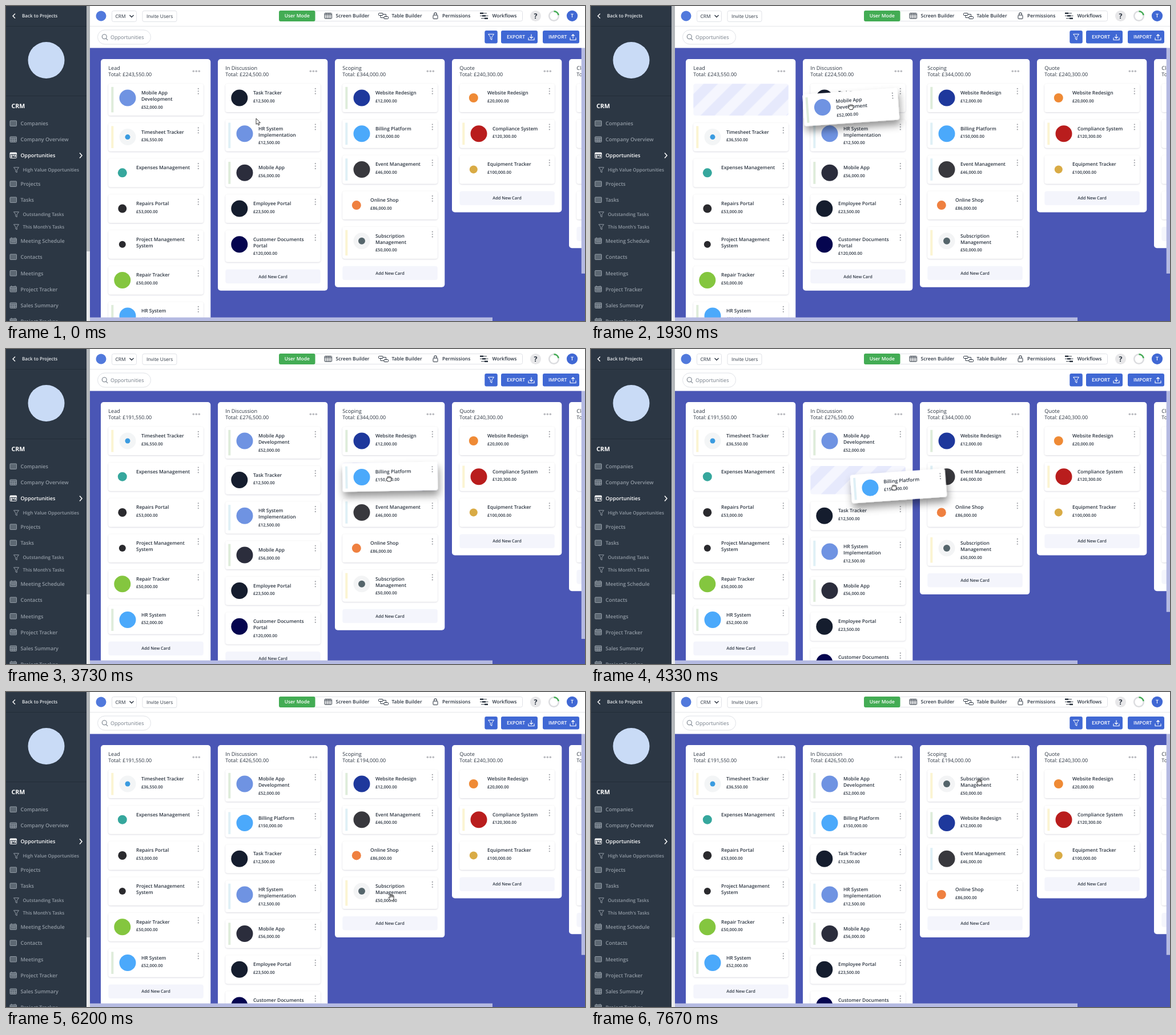
Recreate the animation shown at these times as an HTML page. Size 1014 by 552 pixels, loop 9.99 s.

```html
<!DOCTYPE html>
<html lang="en">
<head>
<meta charset="utf-8">
<title>Opportunities board</title>
<style>
html, body { margin: 0; width: 100%; height: 100%; overflow: hidden; background: #fff; }
svg { display: block; width: 1014px; height: 552px; }
text { font-family: "Open Sans", sans-serif; text-rendering: geometricPrecision; white-space: pre; }
</style>
</head>
<body>
<svg id="stage" viewBox="0 0 1014 552" xmlns="http://www.w3.org/2000/svg"></svg>
<script>
const LOOP = 9990, FPS = 15;
const CARD_W = 166.5, CARD_H = 49.7, TALL_H = 55.6, GAP = 13, TOP = 136.3, INSET = 13.3;
const INK = '#2b3440', SIDE = '#2c3744', BLUE = '#4068d4', BOARD = '#4a56b5';
const GREEN = '#deecda', YELLOW = '#fbf4d2', CYAN = '#dff0f6';

// ---------- drawing helpers ----------
const rect = (x, y, w, h, fill, r = 0, more = '') =>
  `<rect x="${x}" y="${y}" width="${w}" height="${h}" rx="${r}" fill="${fill}" ${more}/>`;
const circle = (x, y, r, fill, more = '') =>
  `<circle cx="${x}" cy="${y}" r="${r}" fill="${fill}" ${more}/>`;
const line = (d, color, w = 1, more = '') =>
  `<path d="${d}" fill="none" stroke="${color}" stroke-width="${w}" ${more}/>`;
// y is the middle of the capitals
const text = (x, y, s, size, weight = 400, fill = INK, more = '') =>
  `<text x="${x}" y="${y + size * 0.355}" font-size="${size}" font-weight="${weight}" fill="${fill}" ${more}>${s}</text>`;
const funnel = (x, y, s, color, w = 1) =>
  line(`M${x - s} ${y - s}H${x + s}L${x + s * .25} ${y}V${y + s}L${x - s * .25} ${y + s * .7}V${y}Z`, color, w, 'stroke-linejoin="round"');
const middle = 'text-anchor="middle"';

// ---------- data ----------
// title lines, amount, bar colour, badge colours and radii
const cards = {
  mobile:   [['Mobile App', 'Development'], '£52,000.00', GREEN, ['#6f93e2', 14.5]],
  time:     [['Timesheet Tracker'], '£36,550.00', YELLOW, ['#f3f5f6', 14.5, '#3a9be0', 4.5]],
  expenses: [['Expenses Management'], '', '', ['#36a79d', 8]],
  repairs:  [['Repairs Portal'], '£53,000.00', '', ['#2a2a2e', 7.5]],
  project:  [['Project Management', 'System'], '', '', ['#2a2a2e', 6]],
  repair:   [['Repair Tracker'], '£50,000.00', '', ['#84c63f', 14.5]],
  hr:       [['HR System'], '£52,000.00', GREEN, ['#4ba9fb', 14.5]],
  task:     [['Task Tracker'], '£12,500.00', '', ['#151d2e', 14.5]],
  hrImpl:   [['HR System', 'Implementation'], '£12,500.00', CYAN, ['#6f93e2', 14.5]],
  app:      [['Mobile App'], '£56,000.00', GREEN, ['#2b2d3c', 14.5]],
  employee: [['Employee Portal'], '£23,500.00', '', ['#151d2e', 14.5]],
  docs:     [['Customer Documents', 'Portal'], '£120,000.00', '', ['#05054f', 14.5]],
  web:      [['Website Redesign'], '£12,000.00', GREEN, ['#1e389c', 14.5]],
  billing:  [['Billing Platform'], '£150,000.00', CYAN, ['#4ba9fb', 14.5]],
  event:    [['Event Management'], '£46,000.00', CYAN, ['#38383d', 14.5]],
  shop:     [['Online Shop'], '£86,000.00', '', ['#ef8040', 8]],
  sub:      [['Subscription', 'Management'], '£50,000.00', YELLOW, ['#f3f4f5', 14.5, '#55656b', 6]],
  quoteWeb: [['Website Redesign'], '£20,000.00', '', ['#ef8a35', 8]],
  comply:   [['Compliance System'], '£120,300.00', YELLOW, ['#b91d1d', 14.5]],
  equip:    [['Equipment Tracker'], '£100,000.00', '', ['#d9ab45', 7]],
  won1: [[''], '', '', null], won2: [[''], '', '', null], won3: [[''], '', '', null], won4: [[''], '', '', null]
};
const height = id => cards[id][0].length > 1 && cards[id][1] ? TALL_H : CARD_H;
const columns = ['Lead', 'In Discussion', 'Scoping', 'Quote', 'Closed'].map((name, i) => [166 + 205 * i, name]);

// Who stands where at a given time
function lists(t) {
  const lead = ['time', 'expenses', 'repairs', 'project', 'repair', 'hr'];
  const talk = ['task', 'hrImpl', 'app', 'employee', 'docs'];
  const scope = ['web', 'event', 'shop'];
  (t < 1999 ? lead : talk).unshift('mobile');
  (t < 4266 ? scope : talk).splice(1, 0, 'billing');
  const place = t < 6466 ? scope.length : t < 6733 ? 2 : t < 6999 ? 1 : 0;
  scope.splice(place, 0, 'sub');
  return [lead, talk, scope, ['quoteWeb', 'comply', 'equip'], ['won1', 'won2', 'won3', 'won4']];
}
const totals = t => [
  t < 2866 ? '243,550' : '191,550',
  t < 2866 ? '224,500' : t < 5599 ? '276,500' : '426,500',
  t < 5599 ? '344,000' : '194,000', '240,300', '180,000'
];

// ---------- motion tracks: [time, ...values] ----------
const pointer = [
  [133, 438, 197], [667, 264, 165], [800, 264, 165], [1200, 293, 181], [1800, 433, 179], [1933, 455, 176.5],
  [2133, 467, 171], [3000, 467, 171], [3533, 670, 227], [3733, 670.5, 227], [4000, 646, 232], [4333, 530.5, 242],
  [4667, 484, 247], [4800, 478, 247], [5667, 478, 247], [6200, 675, 360], [6267, 675, 360], [6800, 676, 239],
  [7200, 680, 158]
];
const drags = [
  { id: 'mobile', from: 866, drop: 2066, to: 2466, x: 179.3, y: TOP,
    path: [[800, 0, 0, 0], [1200, 29.5, 15.5, -3.6], [1800, 170, 15, -4], [1933, 192.5, 13, -4], [2133, 205, 0, 0]] },
  { id: 'billing', from: 3666, drop: 4533, to: 4866, x: 589.3, y: 199,
    path: [[3667, 0, 0, 0], [3733, 0, 0, -1], [4000, -22, 5, -4], [4333, -134, 16, -4], [4533, -190, 12, -4], [4667, -205, 5.9, 0]] },
  { id: 'sub', from: 6333, drop: 7266, to: 7666, x: 589.3, y: 324.4,
    path: [[6267, 0, 0, 0], [6533, 0, -54, -4], [6800, 1, -121, -4], [7200, 5, -202, -4], [7400, 0, -188.1, 0]] }
];

// Smooth curve through the keys that never overshoots
function follow(keys, t) {
  const last = keys.length - 1;
  if (t <= keys[0][0]) return keys[0].slice(1);
  if (t >= keys[last][0]) return keys[last].slice(1);
  let i = 0;
  while (t >= keys[i + 1][0]) i++;
  const slope = (k, n) => (keys[k + 1][n] - keys[k][n]) / (keys[k + 1][0] - keys[k][0]);
  const tangent = (k, n) => {
    if (k === 0 || k === last) return 0;
    const a = slope(k - 1, n), b = slope(k, n);
    return a * b > 0 ? 2 * a * b / (a + b) : 0;
  };
  const [t0, t1] = [keys[i][0], keys[i + 1][0]], d = t1 - t0, u = (t - t0) / d;
  return keys[i].slice(1).map((p, j) => {
    const n = j + 1, q = keys[i + 1][n];
    return p + (q - p) * u * u * (3 - 2 * u) +
      d * u * (1 - u) * ((1 - u) * tangent(i, n) - u * tangent(i + 1, n));
  });
}

// ---------- static parts ----------
function sidebar() {
  const grey = '#929ba5', dim = '#5d6873';
  let s = rect(0, 0, 141, 552, SIDE) + rect(0, 35, 141, 1, '#232d38') + rect(0, 157, 141, 1, '#232d38') +
    line('M16 13.5L12 17.5L16 21.5', '#fff', 1.4) + text(28, 17.5, 'Back to Projects', 8.1, 600, '#e6e9ec') +
    circle(70.5, 95, 32, '#c9dbf6') + text(9.5, 175, 'CRM', 10.6, 700, '#fff');
  const items = [[206, 'Companies', 0], [234, 'Company Overview', 1], [262, 'Opportunities', 2], [312, 'Projects', 0],
    [340, 'Tasks', 0], [412, 'Meeting Schedule', 3], [440, 'Contacts', 0], [468.5, 'Meetings', 0],
    [496.5, 'Project Tracker', 3], [525, 'Sales Summary', 1], [553, 'Project Tracker', 3]];
  for (const [y, name, kind] of items) {
    const on = kind === 2, c = on ? '#fff' : grey;
    s += rect(7, y - 5, 11.5, 9.5, on ? 'none' : dim, 1, `stroke="${c}" stroke-width="1"`);
    if (kind === 1) s += line(`M7 ${y - 2}h11.5M7 ${y + 1.5}h11.5M11 ${y - 2}v6M14.5 ${y - 2}v6`, c, .8);
    if (on) s += rect(7, y - 5, 11.5, 2.5, c) + rect(8.5, y - 1.5, 2, 5, c) + rect(11.7, y - 1.5, 2, 3, c) + rect(15, y - 1.5, 2, 4, c);
    if (kind === 3) s += line(`M7 ${y - 2}h11.5M9.5 ${y - 6.5}v2M16 ${y - 6.5}v2M9 ${y + 1}h8`, c, 1);
    s += text(25.5, y, name, 9, 600, c);
  }
  for (const [y, name] of [[287, 'High Value Opportunities'], [365, 'Outstanding Tasks'], [387, "This Month's Tasks"]])
    s += funnel(18, y + .3, 4.5, grey) + text(29.5, y, name, 8.1, 600, grey);
  return s + line('M129 257.5L133 262L129 266.5', '#fff', 1.5) + rect(141, 0, 6, 552, '#e9eaec') + rect(141, 0, 6, 430, '#b3b7bb');
}

function header() {
  const edge = 'stroke="#e0e2e7" stroke-width="1"';
  let s = rect(147, 0, 867, 73.5, '#fff') + rect(147, 35, 867, 1, '#e6e7ea') + circle(166.5, 17.5, 9, '#5179dc') +
    rect(185.5, 8.5, 43, 19, '#fff', 3, edge) + text(191.5, 17.8, 'CRM', 8.45) + line('M216.5 16l3.5 3.5l3.5-3.5', INK, 1.4) +
    rect(239, 8.5, 60, 19, '#fff', 3, edge) + text(246, 17.8, 'Invite Users', 8.45) +
    rect(478.5, 8.5, 426, 18, '#fff', 3, edge) + rect(478, 8, 63.5, 19, '#43ac54', 3) +
    text(509.7, 17.3, 'User Mode', 8.45, 600, '#fff', middle);
  for (const [x, name] of [[577.5, 'Screen Builder'], [675.5, 'Table Builder'], [764, 'Permissions'], [851.5, 'Workflows']])
    s += text(x, 17.3, name, 8.45, 600);
  s += rect(558, 12.5, 12.5, 9.5, 'none', 1, `stroke="${INK}"`) + line('M561 12.5v9.5M564.2 12.5v9.5M567.4 12.5v9.5M558 15h12.5', INK, .9) +
    rect(652.5, 12.5, 7.5, 4, 'none', 1, `stroke="${INK}"`) + rect(662, 18.5, 7.5, 4, 'none', 1, `stroke="${INK}"`) +
    line('M660 14.5h5.5v4M656 16.5v4h6', INK, .9) +
    rect(748, 16, 8, 6.5, 'none', 1, `stroke="${INK}"`) + line('M749.8 16v-2a2.2 2.2 0 0 1 4.4 0v2', INK, 1.1) +
    rect(830, 11.5, 6, 2.5, INK) + rect(834, 16, 6, 2.5, INK) + rect(838, 20.5, 6, 2.5, INK) +
    line('M836 12.7h6M830 17.2h4M840 17.2h4.5M832 21.7h6', INK, .9) +
    circle(927.5, 17.5, 9.5, '#e7e7e9') + text(927.5, 17.5, '?', 12.5, 700, INK, middle) +
    circle(959.5, 17.5, 8.3, 'none', 'stroke="#dcdde0" stroke-width="2.6"') +
    line('M959.5 9.2A8.3 8.3 0 0 1 967.6 16', '#43ac54', 2.6) +
    circle(991.5, 17.3, 9.6, BLUE) + text(991.5, 17.3, 'T', 8.8, 600, '#fff', middle) +
    rect(160.5, 42, 93, 25, '#fff', 12.5, edge) + circle(172.3, 53.8, 4, 'none', 'stroke="#747d88" stroke-width="1.1"') +
    line('M175.2 56.8l3 3', '#747d88', 1.1) + text(183, 54.7, 'Opportunities', 9, 400, '#727b86') +
    rect(838.3, 43, 22.5, 22.5, BLUE, 3) + funnel(849.6, 54.3, 5, '#fff') +
    rect(867, 43, 64, 22.5, BLUE, 3) + text(877, 54.3, 'EXPORT', 8.45, 600, '#fff') +
    rect(940, 43, 64, 22.5, BLUE, 3) + text(950, 54.3, 'IMPORT', 8.45, 600, '#fff');
  const tray = x => `M${x} 55.5v4h10v-4`;
  return s + line(tray(915) + 'M920 49.5v7M917.3 54l2.7 2.7l2.7-2.7', '#fff', 1.1) +
    line(tray(988) + 'M993 57v-7M990.3 52.5l2.7-2.7l2.7 2.7', '#fff', 1.1);
}

function cardArt(id) {
  const [title, amount, bar, badge] = cards[id], h = height(id);
  const cx = bar ? 33.7 : 24.5, tx = bar ? 57.6 : 48.7;
  let s = rect(0, 0, CARD_W, h, '#fff', 4, 'filter="url(#soft)"');
  if (bar) s += rect(5, 5.5, 4, h - 11, bar);
  if (badge) for (let i = 0; i < badge.length; i += 2) s += circle(cx, 24.7, badge[i + 1], badge[i]);
  title.forEach((part, i) => s += text(tx, 15.8 + 11 * i, part, 8.45, 600));
  s += text(tx, 29.7 + (title.length - 1) * 11, amount, 7.4, 600);
  for (const y of [8.6, 13, 17.4]) s += circle(157.5, y, 1.15, '#a3a5aa');
  return `<g id="${id}">${s}</g>`;
}

const columnArt = ([x, name], i) =>
  rect(x, 93, 192.3, 100, '#fff', 5, `id="col${i}"`) + text(x + INSET, 108.4, name, 9.15) +
  text(x + INSET, 119.8, '', 9, 400, INK, `id="sum${i}"`) +
  [162, 167, 172].map(d => circle(x + d + .3, 114.2, 1.8, '#b9babf')).join('') +
  `<g id="add${i}">${rect(x + INSET, 0, CARD_W, 24.6, '#f4f5fc', 4)}${text(x + 96.5, 12.3, 'Add New Card', 7.4, 600, INK, middle)}</g>`;

const stage = document.getElementById('stage');
stage.innerHTML = `<defs>
  <filter id="soft" x="-10%" y="-20%" width="120%" height="150%"><feDropShadow dx="0" dy=".8" stdDeviation="1.1" flood-color="#1c2040" flood-opacity=".2"/></filter>
  <filter id="lift" x="-30%" y="-60%" width="160%" height="260%"><feDropShadow dx="2" dy="9" stdDeviation="7" flood-color="#000" flood-opacity=".42"/></filter>
  <pattern id="stripes" width="50" height="50" patternUnits="userSpaceOnUse" patternTransform="translate(18 0)">
    <rect width="50" height="50" fill="#f5f6fe"/><path d="M0 0H25L0 25ZM50 0V25L25 50H0Z" fill="#e6e9fc"/></pattern>
  <clipPath id="view"><rect x="147" y="73" width="861" height="473"/></clipPath></defs>` +
  rect(147, 73, 867, 479, BOARD) +
  `<g clip-path="url(#view)">${columns.map(columnArt).join('')}<g id="slot">${rect(0, 0, CARD_W, 50, 'url(#stripes)', 4)}</g>` +
  `<g id="deck">${Object.keys(cards).map(cardArt).join('')}</g></g>` +
  rect(147, 545.7, 705, 6.3, '#b5bae2') + rect(1007.7, 73, 6.3, 395, '#b5bae2', 0, 'id="thumb"') +
  sidebar() + header() +
  `<g id="pointer" stroke="#222" stroke-width=".9" stroke-linejoin="round" fill="#fff">
    <path id="arrow" d="M0 0V10.4L2.4 8.3L4 12L5.8 11.2L4.2 7.7H7.4Z"/>
    <path id="open" d="M-2.6 .5V-3.6a.85 .85 0 0 1 1.7 0V-4.4a.85 .85 0 0 1 1.7 0V-3.8a.85 .85 0 0 1 1.7 0V-2.6a.8 .8 0 0 1 1.6 0V2.2L3.2 5.2H-1.8L-4.8 .8a.9 .9 0 0 1 1.4-1.1ZM-.9-3.6V-.3M.8-4V-.3M2.5-3V-.3"/>
    <path id="fist" d="M-2.8 .2V-2.4a.85 .85 0 0 1 1.8 0a.85 .85 0 0 1 1.8-.3a.85 .85 0 0 1 1.7 .3a.8 .8 0 0 1 1.6 .5V2.2L3.2 5H-1.8L-4.2 1.8V.4ZM-1-2.2V-.6M.8-2.4V-.6M2.5-2.2V-.6"/></g>`;

const el = id => document.getElementById(id);
const move = (id, x, y, extra = '') => el(id).setAttribute('transform', `translate(${x} ${y})${extra}`);
const show = (id, on) => el(id).setAttribute('display', on ? 'inline' : 'none');
let lifted = null;

function lift(id) {
  if (id === lifted) return;
  if (lifted) el(lifted).firstChild.setAttribute('filter', 'url(#soft)');
  if (id) {
    el('deck').appendChild(el(id));
    el(id).firstChild.setAttribute('filter', 'url(#lift)');
  }
  lifted = id;
}

function draw(ms) {
  // steps of 1/15 s, whose starts fall on whole hundredths of a second
  const t = Math.floor(ms * FPS / 1000 + 0.06) * 1000 / FPS;
  const drag = drags.find(d => t >= d.from && t < d.to);
  const sums = totals(t);
  let lowest = 0;

  lift(drag ? drag.id : null);
  show('slot', drag);
  lists(t).forEach((list, i) => {
    const x = columns[i][0] + INSET;
    let y = TOP;
    for (const id of list) {
      if (drag && id === drag.id) {
        move('slot', x, y);
        el('slot').firstChild.setAttribute('height', height(id));
      } else move(id, x, y);
      y += height(id) + GAP;
    }
    move('add' + i, 0, y);
    const bottom = y + 24.6 + 12.5;
    el('col' + i).setAttribute('height', bottom - 93);
    el('sum' + i).textContent = `Total: £${sums[i]}.00`;
    lowest = Math.max(lowest, bottom);
  });
  el('thumb').setAttribute('height', 473 * 473 / (lowest + 20 - 73));

  if (drag) {
    const [dx, dy, turn] = follow(drag.path, t);
    move(drag.id, drag.x + dx, drag.y + dy, ` rotate(${turn} ${CARD_W / 2} ${height(drag.id) / 2})`);
  }

  const [px, py] = follow(pointer, t);
  const column = columns.find(c => px > c[0] + INSET && px < c[0] + INSET + CARD_W);
  const held = drag && t < drag.drop;
  const arrow = !held && (t < 199 || !column);
  move('pointer', px, py);
  show('arrow', arrow);
  show('fist', held);
  show('open', !arrow && !held);
}

const start = performance.now();
function tick() {
  draw((performance.now() - start) % LOOP);
  requestAnimationFrame(tick);
}
tick();
</script>
</body>
</html>
```
